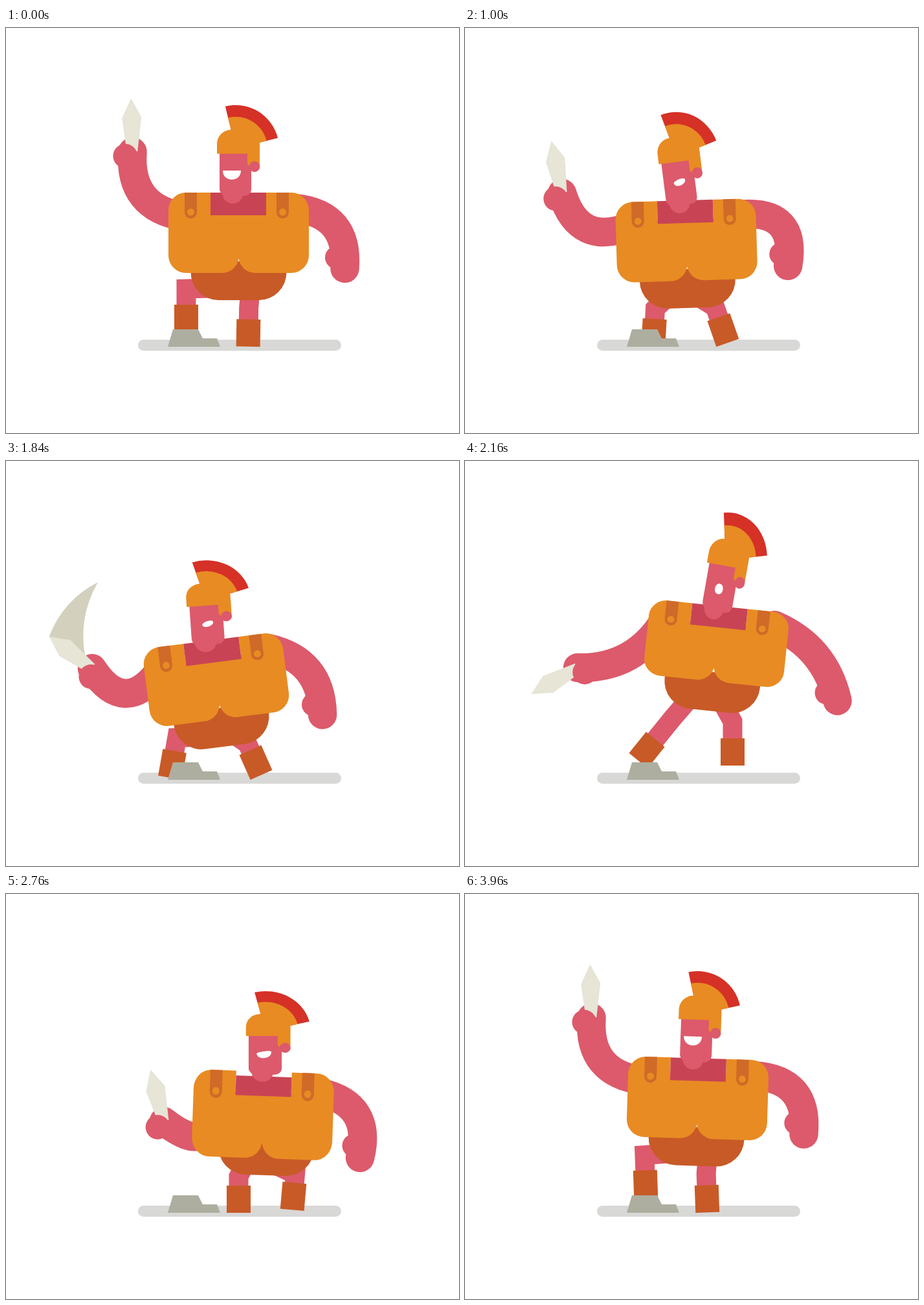
Write an HTML page with a canvas that moves like this. It is 700x625 px and loops after 4200 ms.

```html
<!DOCTYPE html>
<html lang="en">
<head>
<meta charset="utf-8">
<title>Gladiator</title>
<style>
html, body { margin: 0; width: 100%; height: 100%; overflow: hidden; background: #fff; }
canvas { display: block; width: 100vw; height: 100vh; }
</style>
</head>
<body>
<canvas id="stage" width="700" height="625"></canvas>
<script>
const ctx = document.getElementById('stage').getContext('2d');
const LOOP = 4200, STEP = 40, REST = 3960, RAD = Math.PI / 180, GROUND = 492;
const SKIN = '#dc5a6b', NECK = '#c84455', GOLD = '#e88b23', STRAP = '#cf6a28', LEATHER = '#c85a27',
  RED = '#d53127', STEEL = '#e6e5d6', FLOOR = '#d8d8d6', ROCK = '#aeaea0';

// body: x, y, tilt; head: tilt, stretch; hand: sword hand x, y; sword: angle;
// swing: free hand from the body; left, right: boot x, tilt, lift
const stand = {
  body: [359.5, 316, 0], stretch: 1, head: [0, 1], grin: 1,
  hand: [195.5, 191], sword: 0, swing: [164, 55], left: [278.5, 0, 23], right: [374.5, 1, 0]
};
// A moment names only the parts that have a key there.
const moments = [
  { at: 0, ...stand },
  { at: 420, hand: [194, 300], sword: -38 },
  { at: 680, body: [367, 323, -1.5], head: [-15, 1], grin: 1, hand: [192, 380], sword: -23,
    swing: [130, 48], left: [349, -33, 3], right: [397, 10, 2] },
  { at: 840, body: [383, 322, 1], head: [-6, 1.03], hand: [215, 330], left: [362, 0, 0], right: [428, 0, 0] },
  { at: 1000, hand: [150, 255], sword: -10 },
  { at: 1100, body: [322, 331, -3], grin: 0, hand: [97, 320], sword: -85, left: [257, 4, 0], right: [384.5, -27, 0] },
  { at: 1240, hand: [115, 280], sword: -140 },
  { at: 1320, body: [329.5, 328.5, -1.6], head: [-11, 1.02], hand: [124, 259], sword: -32,
    swing: [184, 32], left: [256, 5, 0], right: [384.5, -29, 0] },
  { at: 1720, body: [338, 322, -1], stretch: 1, hand: [148, 270], sword: 5 },
  { at: 1840, body: [325, 337.5, -7.3], head: [-4, .93], grin: 0, hand: [133, 320], sword: -52,
    swing: [164, 54], left: [257, 10, 0], right: [386, -24, 0] },
  { at: 1920, body: [328, 344, -6], hand: [143, 332], sword: -78 },
  { at: 2160, body: [388.5, 282, 6], stretch: .94, head: [10, 1.1], hand: [174, 319], sword: -118,
    swing: [187, 88], left: [281, 39, 18], right: [413.5, 0, 22] },
  { at: 2260, body: [408, 274, 6], hand: [184, 318], sword: -114 },
  { at: 2400, body: [424, 310, 4], head: [6, 1], swing: [188, 70] },
  { at: 2540, body: [418, 350, 1], stretch: .95, head: [0, .88], left: [359.5, 0, 0], right: [446, 4, 0] },
  { at: 2760, body: [397, 341, 2], stretch: 1.08, head: [0, .92], grin: .45, hand: [244, 351], sword: -13,
    swing: [150, 66], left: [359.5, 0, 0], right: [444, 5, 3] },
  { at: 3080, body: [366, 322, 0], hand: [208, 270], sword: -25, left: [278.5, -5, 25], right: [376, 1, 0] },
  { at: 3320, ...stand, body: [359, 319, 1], hand: [195.5, 199] },
  { at: REST, ...stand, body: [359.5, 315.5, 1.8], head: [2, 1], left: [279, -2, 23], right: [374, -2, 0] }
];

// Smooth motion through keys [time, ...values], without overshoot.
function track(keys) {
  const slope = (i, c) => (keys[i + 1][c] - keys[i][c]) / (keys[i + 1][0] - keys[i][0]);
  const tangent = (i, c) => {
    if (i === 0 || i === keys.length - 1) return 0;
    const a = slope(i - 1, c), b = slope(i, c);
    return a * b <= 0 ? 0 : 2 * a * b / (a + b);
  };
  return t => {
    let i = 0;
    while (i < keys.length - 2 && t >= keys[i + 1][0]) i++;
    const span = keys[i + 1][0] - keys[i][0];
    const u = (t - keys[i][0]) / span, v = 1 - u;
    return keys[i].slice(1).map((from, n) => {
      const c = n + 1;
      return from * v * v * (1 + 2 * u) + keys[i + 1][c] * u * u * (3 - 2 * u)
        + span * u * v * (v * tangent(i, c) - u * tangent(i + 1, c));
    });
  };
}
const tracks = Object.keys(stand).map(part =>
  [part, track(moments.filter(m => part in m).map(m => [m.at].concat(m[part])))]);
const poseAt = t => Object.fromEntries(tracks.map(([part, value]) => [part, value(t)]));

const lerp = (a, b, u) => a + (b - a) * u;
const turn = (x, y, deg) => {
  const c = Math.cos(deg * RAD), s = Math.sin(deg * RAD);
  return [x * c - y * s, x * s + y * c];
};
const place = ([x, y, deg], dx, dy) => {
  const [rx, ry] = turn(dx, dy, deg);
  return [x + rx, y + ry];
};
function fill(color, draw) {
  ctx.fillStyle = color;
  ctx.beginPath();
  draw();
  ctx.fill();
}
const box = (color, x, y, w, h, r = 0) => fill(color, () => ctx.roundRect(x, y, w, h, r));
const disc = (color, x, y, r) => fill(color, () => ctx.arc(x, y, r, 0, 7));
const poly = (color, points) => fill(color, () => points.forEach(p => ctx.lineTo(...p)));
function local([x, y, deg], sx, sy, draw) {
  ctx.save();
  ctx.translate(x, y);
  ctx.rotate(deg * RAD);
  ctx.scale(sx, sy);
  draw();
  ctx.restore();
}
function limb(width, cap, draw) {
  ctx.strokeStyle = SKIN;
  ctx.lineWidth = width;
  ctx.lineCap = cap;
  ctx.miterLimit = 2;
  ctx.beginPath();
  draw();
  ctx.stroke();
}

// The nearer the hand is to the shoulder, the more the arm bends. Returns the forearm angle.
function arm([sx, sy], [hx, hy], reach) {
  const dx = hx - sx, dy = hy - sy, chord = Math.hypot(dx, dy);
  const bend = Math.max(0, reach - .68 * chord) / chord;
  const ex = (sx + hx) / 2 + dy * bend, ey = (sy + hy) / 2 - dx * bend;
  limb(44.5, 'round', () => {
    ctx.moveTo(sx, sy);
    ctx.quadraticCurveTo(ex, ey, hx, hy);
  });
  return Math.atan2(hy - ey, hx - ex) / RAD;
}

// The shin follows the boot; the thigh joins it to the hip.
function leg(hip, [x, tilt, lift]) {
  const w = 37, h = 42, [, drop] = turn(w / 2, h / 2, Math.abs(tilt));
  const boot = [x, GROUND - lift - drop, tilt];
  const ankle = place(boot, 0, 4 - h / 2);
  const shin = Math.max(0, .6 * Math.hypot(hip[0] - ankle[0], hip[1] - ankle[1]) - 7);
  limb(30, 'butt', () => {
    ctx.moveTo(...hip);
    ctx.lineTo(...place(boot, 0, 4 - h / 2 - shin));
    ctx.lineTo(...ankle);
  });
  local(boot, 1, 1, () => box(LEATHER, -w / 2, -h / 2, w, h));
}

function freeArm({ body, swing }) {
  const hand = [body[0] + swing[0], body[1] + swing[1]];
  const forearm = arm(place(body, 86, -38), hand, 142);
  disc(SKIN, ...place([...hand, forearm + 139], 21, 0), 18);
}

// Control point that bows the line from p to q to the left.
function bow([px, py], [qx, qy]) {
  const k = .19 * Math.sign(qy - py);
  return [(px + qx) / 2 - (qy - py) * k, (py + qy) / 2 + (qx - px) * k];
}
const cuts = [
  { peak: 1320, color: '#e3e2d2', tail: [62, 365] },
  { peak: 1840, color: '#d3d0be', tail: [142, 187] }
];
function trail(t, tip, [x, y]) {
  for (const { peak, color, tail } of cuts) {
    if (t < peak - 20 || t > peak + 60) continue;
    const end = tail.map((v, i) => lerp(v, tip[i], Math.max(0, t - peak) / 80));
    const root = [x - 8, y - 27];
    fill(color, () => {
      ctx.moveTo(...tip);
      ctx.quadraticCurveTo(...bow(tip, end), ...end);
      ctx.quadraticCurveTo(...bow(end, root), ...root);
      ctx.lineTo(x, y);
    });
  }
}
function swordArm(t, { body, hand, sword: [angle] }) {
  arm(place(body, -85, -25), hand, 145);
  const thumb = place([...hand, angle + 150], 13, 0);
  trail(t, place([...thumb, angle], 9, -89), thumb);
  local([...thumb, angle], 1, 1, () => poly(STEEL, [[9, -89], [25, -60], [19, -7], [2, -10], [-5, -58]]));
  disc(SKIN, ...thumb, 18.8);
}

function torso(body, stretch, swell) {
  local(body, 1, stretch, () => {
    fill(GOLD, () => {
      ctx.roundRect(-108.5, -62, 108.8, 124, [27, 0, 26, 27]);
      ctx.roundRect(-.3, -62, 108.8, 124, [0, 27, 27, 26]);
    });
    const drop = swell * 85;
    box('#fff', -43.5, -63, 86, 30);
    box(NECK, -43.5, -62 + drop, 86, 35 - drop);
    for (const side of [-74, 68]) {
      box(STRAP, side - 9.5, -62, 19, 40, [0, 0, 9.5, 9.5]);
      disc(GOLD, side, -32, 5.5);
    }
  });
}

function mouth(grin, gasp) {
  const shape = (squint, smile, round) => lerp(lerp(squint, smile, grin), round, gasp);
  const half = shape(17, 28, 13) / 2, low = shape(5, 14, 7) * 4 / 3, high = shape(4, 0, 8) * 4 / 3;
  local([shape(5, -1.5, 2), shape(-31, -35, -27), shape(-17, 0, 0)], 1, 1, () => fill('#fff', () => {
    ctx.moveTo(-half, 0);
    ctx.bezierCurveTo(-half, low, half, low, half, 0);
    ctx.bezierCurveTo(half, -high, -half, -high, -half, 0);
  }));
}
function head(jaw, stretch, grin) {
  local(jaw, 1 / Math.sqrt(stretch), stretch, () => {
    const crest = (color, r) => fill(color, () => {
      ctx.moveTo(4.5, -69);
      ctx.arc(4.5, -69, r, -104 * RAD, -14 * RAD);
    });
    crest(RED, 67);
    crest(GOLD, 49);
    box(SKIN, -20.5, -65, 49, 69, [0, 0, 10, 11]);
    disc(SKIN, 0, 0, 16);
    box(GOLD, -24.5, -98, 66, 37, [22, 12, 0, 0]);
    box(GOLD, 22.5, -62, 19, 20, [0, 0, 3, 5]);
    disc(SKIN, 33.5, -41, 8.3);
    mouth(grin, Math.max(0, stretch - 1.03) / .07);
  });
}

function render(t) {
  const pose = poseAt(t), { body } = pose, tilt = body[2];
  const [stretch] = pose.stretch, [nod, headStretch] = pose.head, [grin] = pose.grin;
  const swell = Math.max(0, stretch - 1);
  const hips = [...place(body, 85 * swell, 104 - 140 * swell), tilt];
  const jaw = [...place(body, 75 * swell - 9, (.3 * Math.abs(nod) - 61) * stretch), nod];

  box('#fff', 0, 0, 700, 625);
  box(FLOOR, 204, 481, 314, 17, 8.5);
  leg(place(hips, 18, -15), pose.right);
  leg(place(hips, -30, -19), pose.left);
  poly(ROCK, [[258, 465], [297, 465], [304, 479], [326, 479], [331, 492], [250, 492]]);
  local(hips, 1, 1, () => box(LEATHER, -74, -60, 148, 60, [0, 0, 43, 43]));
  freeArm(pose);
  swordArm(t, pose);
  torso(body, stretch, swell);
  head(jaw, headStretch, grin);
}

const start = performance.now();
function tick() {
  const t = (performance.now() - start) % LOOP;
  render(Math.min(REST, Math.floor(t / STEP) * STEP));
  requestAnimationFrame(tick);
}
tick();
</script>
</body>
</html>
```
